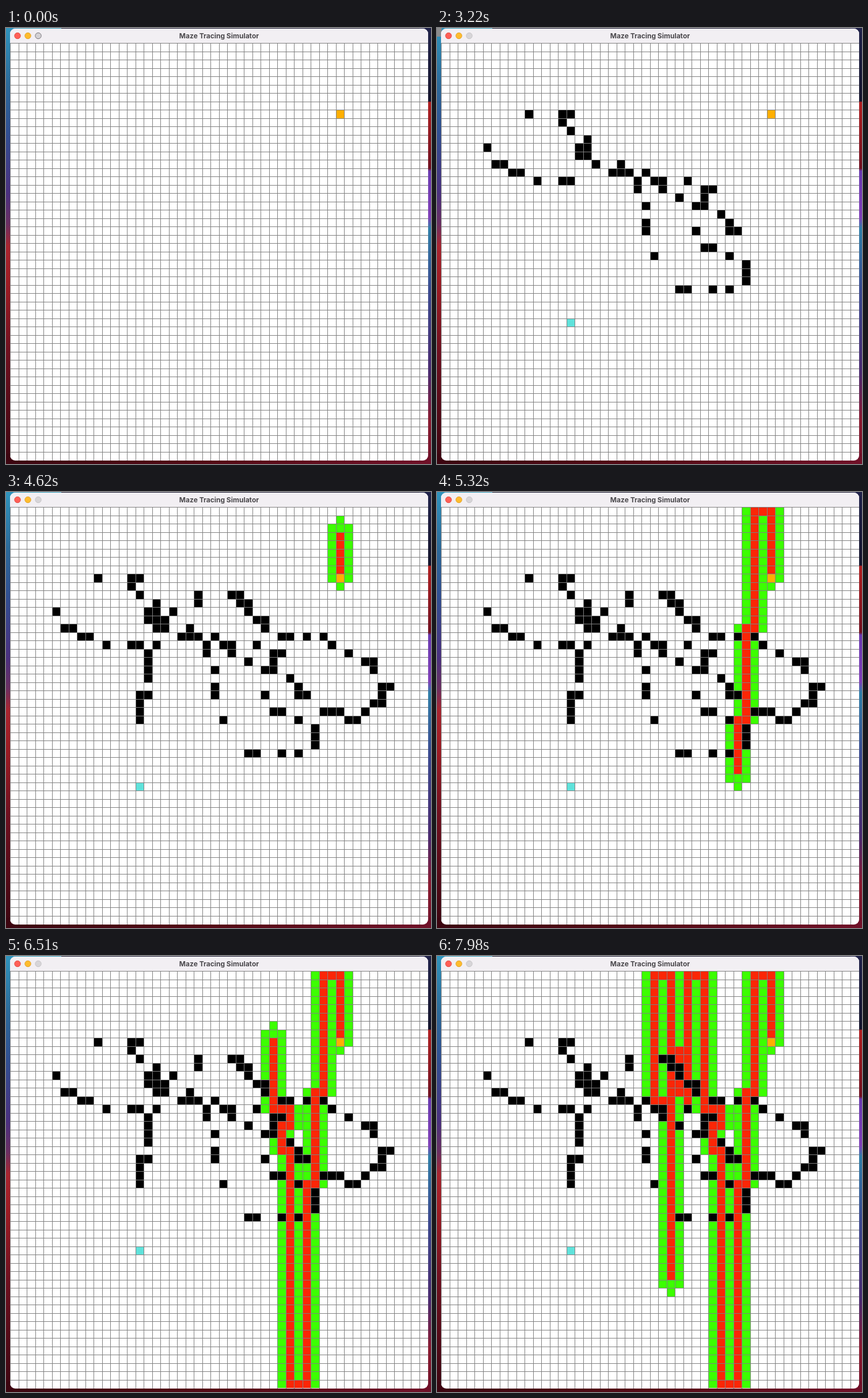
Animation of 738 by 758 pixels, one loop 8 s. Source, as an HTML page with a canvas:

```html
<!DOCTYPE html>
<html lang="en">
<head>
<meta charset="utf-8">
<title>Maze Tracing Simulator</title>
<style>
  html, body { margin: 0; width: 100%; height: 100%; overflow: hidden; background: #4a0510; }
  canvas { display: block; }
</style>
</head>
<body>
<canvas id="stage" width="738" height="758"></canvas>
<script>
const ctx = document.getElementById('stage').getContext('2d');
const LOOP = 8000, TICK = 70, SIZE = 50, PITCH = 14.5;
const GREEN = '#3cff00', RED = '#fb2606', ORANGE = '#ffaf00', CYAN = '#5fe2db';

// A cell is written as row * 100 + column.
const START = 839, GOAL = 3315;

// Walls in the order they are drawn with the mouse.
const leftLoop = [
  1520, 1418, 1317, 1316, 1217, 1216, 1117, 1015, 914, 815, 814, 810,
  512 + 693, 1406, 1407, 1508, 1509, 1611, 1614, 1615
];
leftLoop[12] = 1205;
const middleLoop = [
  1421, 1521, 1522, 1623, 1723, 1924, 2124, 2224, 2525, 2928, 2929, 2932,
  2934, 2836, 2736, 2636, 2235, 2234, 2134, 2033, 1732, 1731, 1629, 1626,
  1625, 1524, 1726, 1828, 1831, 1931, 1930, 2230, 2431, 2432, 2534
];
const rightLoop = [
  2437, 2438, 2439, 2540, 2541, 2442, 2343, 2344, 2244, 2145, 2144, 1943,
  1843, 1842, 1740, 1638, 1537, 1535, 1533, 1532, 1430, 1330, 1329, 1228,
  1128, 1127, 1027, 1026, 1022, 1122, 1219, 1318, 1417, 1617,
  1716, 1816, 1916, 2016, 2216, 2215, 2315, 2415, 2515
];
const walls = [...leftLoop, ...middleLoop, ...rightLoop];

// Depth-first search: up, then down, left, right.
function search() {
  const seen = new Set([...walls, START]);
  const stack = [START], steps = [];
  while (stack.length) {
    const cell = stack.pop(), opened = [];
    if (cell === GOAL) break;
    const row = Math.floor(cell / 100), col = cell % 100;
    for (const [dr, dc] of [[0, 1], [0, -1], [1, 0], [-1, 0]]) {
      const r = row + dr, c = col + dc, next = r * 100 + c;
      if (r < 0 || c < 0 || r >= SIZE || c >= SIZE || seen.has(next)) continue;
      seen.add(next);
      stack.push(next);
      opened.push(next);
    }
    steps.push({ cell, opened });
  }
  return steps;
}
const steps = search();

const gridX = c => Math.floor(7.5 + c * PITCH);
const gridY = r => Math.floor(26.5 + r * PITCH);

function rect(color, x, y, w, h) {
  ctx.fillStyle = color;
  ctx.fillRect(x, y, w, h);
}

function paint(cell, color) {
  const r = Math.floor(cell / 100), c = cell % 100;
  rect(color, gridX(c), gridY(r), gridX(c + 1) - gridX(c), gridY(r + 1) - gridY(r));
}

function gradient(x0, y0, x1, y1, stops) {
  const g = ctx.createLinearGradient(x0, y0, x1, y1);
  for (const [at, color] of stops) g.addColorStop(at, color);
  return g;
}

const leftEdge = gradient(0, 0, 0, 758, [
  [0, '#3094bd'], [.13, '#2c6a9a'], [.24, '#314f92'], [.38, '#4b3080'],
  [.45, '#6b2f62'], [.5, '#a82530'], [.58, '#a01c24'], [.74, '#701020'], [1, '#3c0510']
]);
const rightEdge = gradient(0, 0, 0, 758, [
  [0, '#20224a'], [.168, '#14142c'], [.17, '#b02022'], [.322, '#701020'],
  [.328, '#6a3ab0'], [.435, '#8040b8'], [.46, '#2f7fa8'], [.6, '#3a4a90'],
  [.79, '#4a2a70'], [.9, '#8a1a30'], [1, '#701028']
]);
const bottomEdge = gradient(0, 0, 738, 0, [[0, '#3c0510'], [.5, '#560916'], [1, '#701028']]);

function backdrop(tick) {
  rect('#15152c', 0, 0, 738, 758);
  rect('#2f9ab8', 0, 0, 96, 2);
  rect(leftEdge, 0, 0, 20, 758);
  rect(rightEdge, 718, 0, 20, 758);
  rect(bottomEdge, 0, 740, 738, 18);
  if (tick >= 3 && tick < 65) rect('#8c8c8e', 0, 0, 8, 15);
}

function light(x, fill, ring) {
  ctx.beginPath();
  ctx.arc(x, 13.5, 5.2, 0, Math.PI * 2);
  ctx.fillStyle = fill;
  ctx.fill();
  ctx.strokeStyle = ring;
  ctx.lineWidth = 1;
  ctx.stroke();
}

function titleBar(tick) {
  rect('#f2eff3', 7, 1, 726, 25);
  light(20, '#fe5f57', '#e24b43');
  light(38, '#febc2e', '#e0a028');
  if (tick < 3) light(56, '#d3d1d4', '#77757a');
  else light(56, '#d7d5d8', '#c5c3c6');
  ctx.fillStyle = '#4a484c';
  ctx.font = '700 12px Inter, sans-serif';
  ctx.textAlign = 'center';
  ctx.textBaseline = 'alphabetic';
  ctx.fillText('Maze Tracing Simulator', 370, 17.5);
}

function cells(tick) {
  const drawn = tick < 26 ? 0 : Math.floor(1.01 + 2.7 * (tick - 26));
  walls.slice(0, drawn).forEach(cell => paint(cell, '#000'));

  const count = Math.max(0, Math.floor(7.2 + 3.836 * (tick - 66)));
  steps.slice(0, count).forEach(({ cell, opened }, i) => {
    opened.forEach(next => paint(next, GREEN));
    if (i < count - 1) paint(cell, RED);
  });

  paint(START, ORANGE);
  if (tick >= 10) paint(GOAL, CYAN);
}

function gridLines() {
  for (let i = 0; i < SIZE; i++) {
    rect('#808080', gridX(i), 26, 1, 726);
    rect('#808080', 7, gridY(i), 726, 1);
  }
}

function draw() {
  const tick = Math.floor((performance.now() % LOOP) / TICK);
  backdrop(tick);
  ctx.save();
  ctx.beginPath();
  ctx.roundRect(7, 1, 726, 751, 9);
  ctx.clip();
  rect('#fff', 7, 1, 726, 751);
  cells(tick);
  gridLines();
  titleBar(tick);
  ctx.restore();
  requestAnimationFrame(draw);
}
draw();
</script>
</body>
</html>
```
